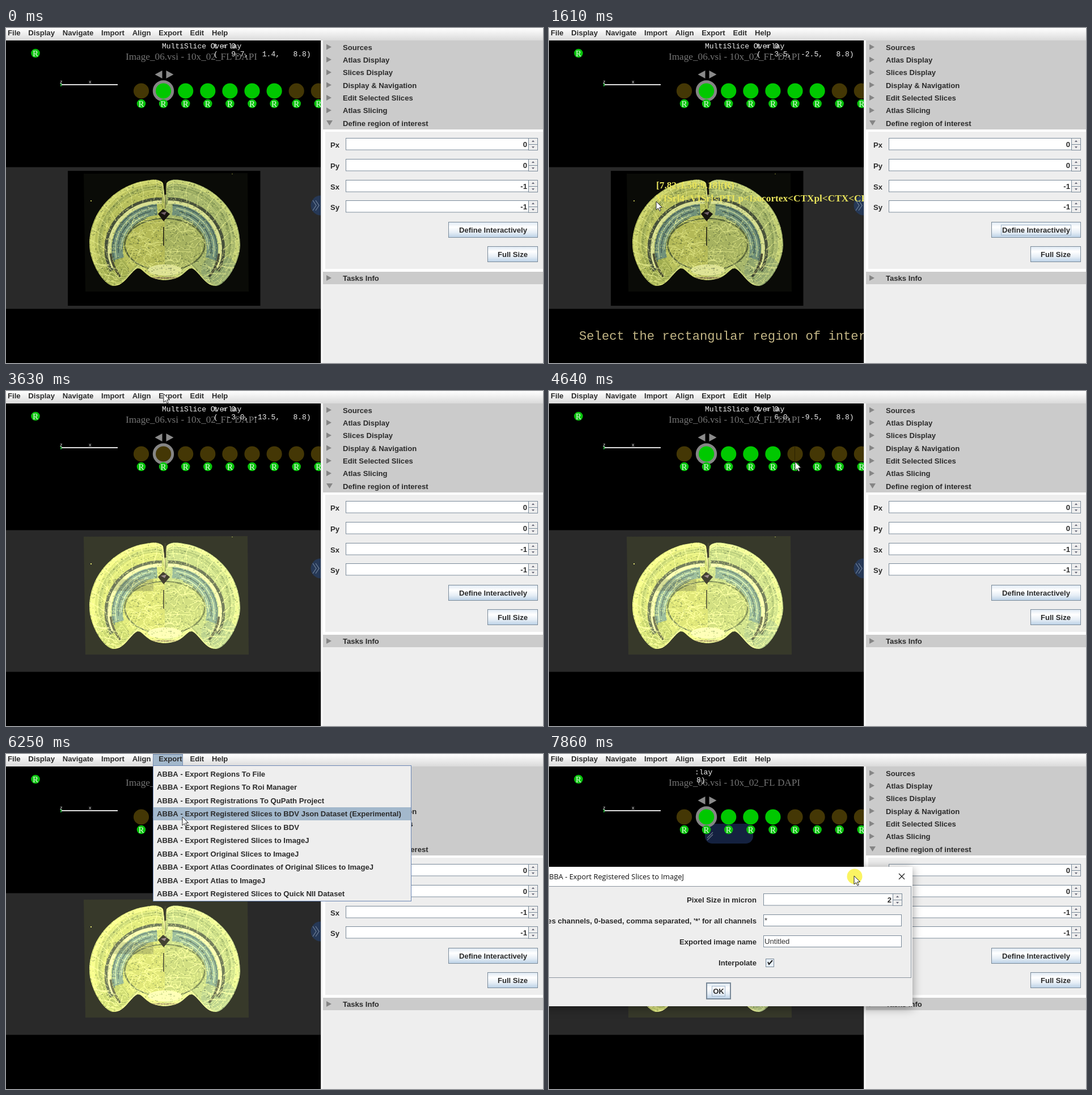
Write an HTML page with a canvas that moves like this. It is 947 px wide and 591 px high and loops after 8 s.

```html
<!DOCTYPE html>
<html lang="en">
<head>
<meta charset="utf-8">
<title>Slice alignment</title>
<style>
html, body { margin: 0; width: 100%; height: 100%; overflow: hidden; background: #000; }
canvas { display: block; width: 947px; height: 591px; }
</style>
</head>
<body>
<canvas id="stage" width="947" height="591"></canvas>
<script>
const W = 947, H = 591, LOOP = 8000, STEP = 201.8;
let g = document.getElementById('stage').getContext('2d');
const UI = 'bold 13.1px "Liberation Sans", Arial, sans-serif';
const PLAIN = '13.1px "Liberation Sans", Arial, sans-serif';
const MONO = '13px "Liberation Mono", monospace';
const SERIF = '"Liberation Serif", serif';
const BORDER = '#7a8a99';

// Where the pointer turns: step, x, y.
const stops = [
  [3, 858, 358], [8, 189, 306], [11, 260, 353], [15, 202, 22], [18, 278, 5], [23, 434, 125],
  [26, 285, 27], [27, 271, 5], [31, 311, 111], [33, 317, 150], [36, 317, 150], [39, 538, 215]
];

function pointer(n) {
  const i = Math.max(1, stops.findIndex(s => s[0] >= n));
  const [a, ax, ay] = stops[i - 1], [b, bx, by] = stops[i];
  const u = Math.max(0, (n - a) / (b - a));
  const k = u * u * (3 - 2 * u);
  return [ax + (bx - ax) * k, ay + (by - ay) * k];
}

// Viewer coordinates of the last pointer place inside the slice view.
function viewCoords(n) {
  for (let m = n; m > 4; m--) {
    const [x, y] = pointer(m);
    if (x < 556 && y >= 22) return [(x - 279.4) * 0.0387, (y - 370.6) * 0.0387];
  }
  return [9.7, 1.4];
}

// Runs a drawing routine on a canvas of its own.
function offscreen(paint) {
  const canvas = document.createElement('canvas'), stage = g;
  canvas.width = W;
  canvas.height = H;
  g = canvas.getContext('2d');
  paint();
  g = stage;
  return canvas;
}

function stroke(color, width, path) {
  g.strokeStyle = color;
  g.lineWidth = width;
  path ? g.stroke(path) : g.stroke();
}

function rect(x, y, w, h, fill, line) {
  if (fill) { g.fillStyle = fill; g.fillRect(x, y, w, h); }
  if (line) { g.strokeStyle = line; g.lineWidth = 1; g.strokeRect(x + 0.5, y + 0.5, w - 1, h - 1); }
}

function oval(x, y, rx, ry, fill) {
  g.fillStyle = fill;
  g.beginPath();
  g.ellipse(x, y, rx, ry, 0, 0, 7);
  g.fill();
}
const disc = (x, y, r, fill) => oval(x, y, r, r, fill);

function poly(pts, fill, line, width = 1) {
  g.beginPath();
  pts.forEach(p => g.lineTo(...p));
  if (fill) { g.closePath(); g.fillStyle = fill; g.fill(); }
  if (line) stroke(line, width);
}

// Small solid triangle pointing in direction (dx, dy).
function triangle(x, y, dx, dy, len, half, fill) {
  poly([[x + dx * len, y + dy * len], [x - dx * len + dy * half, y - dy * len + dx * half],
    [x - dx * len - dy * half, y - dy * len - dx * half]], fill);
}

function text(s, x, y, font, fill, align = 'left') {
  g.font = font;
  g.fillStyle = fill;
  g.textAlign = align;
  g.fillText(s, x, y);
}
const label = (s, x, y, align) => text(s, x, y, UI, '#2b2b2b', align);

// ---- Brain section: one half, mirrored ----

const rim = new Path2D('M0 300L3 274C8 266 22 267 32 269C78 275 132 315 133 382' +
  'C133 412 108 455 90 455C70 455 62 430 48 424C36 424 34 444 0 445');
let seed = 7;
const rnd = () => (seed = seed * 16807 % 2147483647) / 2147483647;

function layer(k, color, width) {
  g.save();
  g.translate(0, 362 * (1 - k));
  g.scale(k, k);
  stroke(color, width, rim);
  g.restore();
}

function band(r, from, to, color, width) {
  g.beginPath();
  g.ellipse(8, 390, r, r * 0.92, 0, from, to);
  stroke(color, width);
}

function half(side) {
  const left = side < 0, ink = 'rgba(240,245,150,.6)';
  g.save();
  g.translate(280, 0);
  g.scale(side, 1);
  g.fillStyle = left ? '#b7bf5c' : '#a7b76c';
  g.fill(rim);
  g.clip(rim);

  layer(0.96, 'rgba(226,232,125,.45)', 6);
  layer(0.86, 'rgba(112,132,72,.4)', 8);
  oval(96, 428, 32, 27, left ? 'rgba(150,166,76,.6)' : 'rgba(130,155,110,.6)');

  // White matter, then the curled blue-green band inside it.
  band(94, -1.6, 0.45, '#48513b', 9);
  band(90, -1.6, 0.4, '#d8df92', 6);
  band(76, -1.5, 0.25, '#71917a', 20);
  for (let i = 0; i < 5; i++) {
    band(84 - 5 * i, -1.5 + 0.08 * i, 0.3 - 0.1 * i, i % 2 ? '#b4c795' : '#475f59', 1.7);
  }
  oval(0, 382, 72, 47, '#59663a');
  oval(0, 382, 69, 45, left ? '#b3b957' : '#a6b260');
  band(88, 0.1, 0.65, 'rgba(44,46,34,.8)', 4);
  oval(0, 427, 30, 10, '#dbe095');
  oval(0, 441, 27, 2, '#80734c');

  // Tissue grain.
  for (let i = 0; i < 1500; i++) {
    const size = 1 + rnd() * 3 | 0;
    rect(rnd() * 134 | 0, 266 + rnd() * 190 | 0, size, 2,
      rnd() < 0.45 ? 'rgba(40,58,34,.28)' : 'rgba(244,250,142,.28)');
  }

  // Atlas borders.
  for (let k = 0.8; k < 1; k += 0.045) layer(k, ink, 0.9);
  for (let a = -1.45; a < 0.9; a += 0.21) {
    const c = Math.cos(a), s = Math.sin(a);
    poly([[8 + 95 * c, 390 + 87 * s], [115 * c, 376 + 95 * s + rnd() * 6], [135 * c, 370 + 106 * s]], null, ink, 1.1);
  }
  for (let i = 0; i < 55; i++) {
    const low = i % 4 === 0;
    const x = low ? 66 + rnd() * 55 : 3 + rnd() * 62, y = low ? 412 + rnd() * 38 : 340 + rnd() * 80;
    const w = 3 + rnd() * 13, h = (rnd() - 0.5) * 22;
    poly([[x - w, y], [x, y + h], [x + w / 2, y + h], [x + w, y - h / 2]], null, ink, 1);
  }
  g.restore();
}

const brain = offscreen(() => {
  half(-1);
  half(1);
  rect(279.5, 268, 3, 26, '#17170f');
  rect(280, 294, 1.5, 24, '#747746');
  poly([[268, 328], [277, 319], [289, 328], [278, 341]], '#17140f');
  poly([[273, 326], [283, 324], [280, 330]], '#72606a');
  rect(277, 351, 2, 33, '#3a3d22');
  rect(149, 304, 2, 2, '#b5b550');
  rect(398, 257, 2, 1, '#777832');
});

function slice(bright) {
  const quad = [[137, 257], [426, 256], [428, 465], [140, 465]];
  if (!bright) rect(109, 252, 339.5, 238, '#000');
  poly(quad, '#0a0b07');
  g.drawImage(brain, 0, 0);
  if (bright) {
    rect(189, 332, 71, 21, 'rgba(50,55,40,.28)');
    g.globalCompositeOperation = 'lighter';
    poly(quad, '#2d2e23');
    g.globalCompositeOperation = 'source-over';
  }
}

// ---- Slice view ----

function tag(x, y) {
  disc(x, y, 7.8, '#08c40c');
  text('R', x, y + 5, '15px ' + SERIF, '#e0f8e0', 'center');
}

function header(late, n) {
  text('Image_06.vsi - 10x_02_FL DAPI', 211, 56, '17.2px ' + SERIF, '#737373');
  if (late) {
    text(':lay', 257, 36, MONO, '#eee');
    text('8)', 260, 50, MONO, '#eee');
    return;
  }
  const nums = [...viewCoords(n), 8.8].map(v => v.toFixed(1).padStart(6));
  text('MultiSlice Overlay', 275, 36, MONO, '#eee');
  text('t = 0', 366, 36, MONO, '#eee');
  text('(' + nums.join(',') + ')', 366, 50, MONO, '#eee');
}

function view(n) {
  const late = n >= 34;
  g.save();
  g.beginPath();
  g.rect(0, 22, 555.5, H - 22);
  g.clip();
  rect(0, 22, 556, H, '#000');
  rect(0, 245.5, 556, 250, '#292929');
  slice(n >= 13);

  disc(555, 313, 17.5, '#263856');
  for (const x of [541, 546]) poly([[x, 304], [x + 6, 313], [x, 322]], null, '#6f8098', 1.2);
  tag(52, 44.5);
  rect(96, 99, 101, 2, '#e0e0e0');
  rect(96, 97, 2, 6, '#1a9a30');
  text('z', 95, 98, '9px "Liberation Sans", sans-serif', '#ddd');
  text('x', 146, 98, '9px "Liberation Sans", sans-serif', '#ddd');

  if (late) {
    g.fillStyle = '#14213f';
    g.beginPath();
    g.roundRect(275, 123, 85, 35, 13);
    g.fill();
    for (const y of [148, 152]) poly([[279, y], [289, y - 10]], null, '#69748c', 1.2);
  }
  header(late, n);

  triangle(269, 82, -1, 0, 6.5, 7, '#8a8a8a');
  triangle(289, 82, 1, 0, 6.5, 7, '#8a8a8a');
  const last = n < 13 ? 6 : n < 22 ? 0 : 4;
  disc(277.5, 111, 18.7, '#858585');
  for (let i = 0; i < 9; i++) {
    const x = 238.5 + 39.1 * i;
    disc(x, 111, 13.6, i > 0 && i <= last ? '#00c800' : '#443705');
    tag(x, 133.5);
  }
  if (n >= 22 && !late) rect(433, 97, 1, 28, '#2a2200');

  if (n >= 3 && n < 13) {
    text('Select the rectangular region of interest', 53, 550, '22.2px "Liberation Mono", monospace', '#c2b585');
  }
  if (n >= 7 && n < 13) regionInfo(...pointer(n));
  g.restore();
}

function regionInfo(x, y) {
  const font = 'bold 17.3px ' + SERIF, color = '#e9e45c';
  const dv = 1.5 + (y - 306) * 0.0387, ml = 9.18 - (x - 189) * 0.0387;
  text(`[7.82;${dv.toFixed(2)};${ml.toFixed(2)}](R)`, x, y - 23, font, color);
  text('VISrl4<VISrl<PTLp<Isocortex<CTXpl<CTX<CH<grey', x, y - 0.5, font, color);
}

// ---- Controls ----

function button(s, x, y, w, h, focus) {
  const fill = g.createLinearGradient(0, y, 0, y + h);
  ['#dde8f3', '#fff', '#e6eef6', '#b8cfe5'].forEach((c, i) => fill.addColorStop(i / 3, c));
  rect(x, y, w, h, fill, BORDER);
  label(s, x + w / 2, y + h / 2 + 4.5, 'center');
  if (focus) {
    const tw = Math.round(g.measureText(s).width) + 4;
    rect(Math.round(x + (w - tw) / 2), y + 5, tw, h - 9, null, '#a3b8cc');
  }
}

function spinner(value, x, y, w) {
  const bx = x + w - 17;
  rect(x, y, w - 16, 21.5, '#fff', BORDER);
  rect(bx, y, 17, 12, '#eee', BORDER);
  rect(bx, y + 11, 17, 11, '#eee', BORDER);
  triangle(bx + 8.5, y + 5.5, 0, -1, 1.5, 2.5, '#667');
  triangle(bx + 8.5, y + 16.5, 0, 1, 1.5, 2.5, '#667');
  label(value, bx - 2, y + 16, 'right');
}

function sidePanel(focus) {
  rect(555.5, 22, W, H - 22, '#eee');
  rect(555.5, 22, 3.5, H, '#f7f7f7');
  rect(559, 22, W, 157, '#cbcbcb');
  rect(559, 179, W, 251, '#fff');
  rect(563, 183, W, 242, '#eee');
  rect(559, 430, W, 22, '#cbcbcb');
  ['Sources', 'Atlas Display', 'Slices Display', 'Display & Navigation', 'Edit Selected Slices',
    'Atlas Slicing', 'Define region of interest'].forEach((s, i) => {
    const y = 34 + 22.35 * i;
    label(s, 594, y + 4.5);
    if (i < 6) triangle(569.5, y - 0.5, 1, 0, 4.5, 5, '#858585');
    else triangle(570.5, y - 0.5, 0, 1, 4.5, 5.5, '#858585');
  });
  label('Tasks Info', 594, 446);
  triangle(569.5, 441, 1, 0, 4.5, 5, '#858585');
  ['Px', 'Py', 'Sx', 'Sy'].forEach((s, i) => {
    const y = Math.round(194 + 36.8 * i);
    label(s, 588, y + 17, 'right');
    spinner(i < 2 ? '0' : '-1', 599, y, 339);
  });
  button('Define Interactively', 780, 342, 158, 28, focus);
  button('Full Size', 849, 385, 89, 28);
}

function menuBar(open) {
  const fill = g.createLinearGradient(0, 0, 0, 22);
  fill.addColorStop(0, '#fff');
  fill.addColorStop(1, '#dadada');
  rect(0, 0, W, 22, fill);
  if (open) rect(259, 0, 53, 21, '#a3b8cc', '#7a8fb0');
  let x = 3;
  for (const s of ['File', 'Display', 'Navigate', 'Import', 'Align', 'Export', 'Edit', 'Help']) {
    label(s, x, 13);
    x += g.measureText(s).width + 13.8;
  }
}

function exportMenu(y) {
  const items = ['Regions To File', 'Regions To Roi Manager', 'Registrations To QuPath Project',
    'Registered Slices to BDV Json Dataset (Experimental)', 'Registered Slices to BDV',
    'Registered Slices to ImageJ', 'Original Slices to ImageJ',
    'Atlas Coordinates of Original Slices to ImageJ', 'Atlas to ImageJ',
    'Registered Slices to Quick NII Dataset'];
  rect(259, 20, 456, 240, '#eee', '#6b86b5');
  items.forEach((s, i) => {
    const top = 23.5 * (i + 1);
    if (y >= top && y < top + 23.5) rect(260, Math.round(top), 454, 23, '#a3b8cc');
    label('ABBA - Export ' + s, 266, top + 16);
  });
}

// ---- Export dialog ----

const dialogLayer = offscreen(() => {
  g.save();
  g.shadowColor = 'rgba(0,0,0,.4)';
  g.shadowBlur = 16;
  g.shadowOffsetY = 3;
  rect(-40, 199, 681, 246, '#eee');
  g.restore();
  rect(-40, 199, 681, 34, '#fff');
  rect(-40, 233, 679, 162, null, '#8a949e');
  text('ABBA - Export Registered Slices to ImageJ', 238, 221, '12.9px "Open Sans", sans-serif', '#111', 'right');
  for (const d of [-5, 5]) poly([[622 - d, 211], [622 + d, 221]], null, '#222', 1.2);
  ['Pixel Size in micron', "Slices channels, 0-based, comma separated, '*' for all channels",
    'Exported image name', 'Interpolate'].forEach((s, i) => label(s, 366, 262 + 37 * i, 'right'));
  spinner('2', 378, 246, 245);
  ['*', 'Untitled'].forEach((s, i) => {
    const y = 283 + 37 * i;
    rect(378, y, 244, 21, '#fff', BORDER);
    text(s, 380, y + 15, PLAIN, '#333');
  });
  rect(382, 361, 15, 15, '#e8f0f8', BORDER);
  poly([[386, 367], [388, 371], [394, 364]], null, '#222', 2);
  button('OK', 278, 404, 42, 28, true);
  rect(277, 403, 44, 30, null, BORDER);
});

// While opening, the window is a little smaller and see-through.
function dialog(opening) {
  g.save();
  if (opening) {
    g.globalAlpha = 0.6;
    g.translate(308, 321.6);
    g.scale(0.976, 0.976);
    g.translate(-308, -321.6);
  }
  g.drawImage(dialogLayer, 0, 0);
  g.restore();
}

function arrow(x, y) {
  g.save();
  g.translate(x, y);
  const shape = new Path2D('M0 0V15L3.5 11.8L6 17L8.2 16L5.8 10.8L10.5 10.5Z');
  g.fillStyle = '#fff';
  g.fill(shape);
  stroke('#222', 1, shape);
  g.restore();
}

function draw(n) {
  const menu = n >= 28 && n < 34;
  const [x, y] = pointer(n);
  view(n);
  sidePanel(n >= 2 && n < 10);
  menuBar(menu);
  if (menu) exportMenu(y);
  if (n >= 35) dialog(n === 35);
  if (n === 39) disc(539, 216, 13.5, 'rgba(250,242,70,.85)');
  if (n > 0) arrow(x, y);
}

const start = performance.now();
function tick() {
  const t = (performance.now() - start) % LOOP;
  draw(Math.min(39, Math.floor((t + 14) / STEP)));
  requestAnimationFrame(tick);
}
tick();
</script>
</body>
</html>
```
